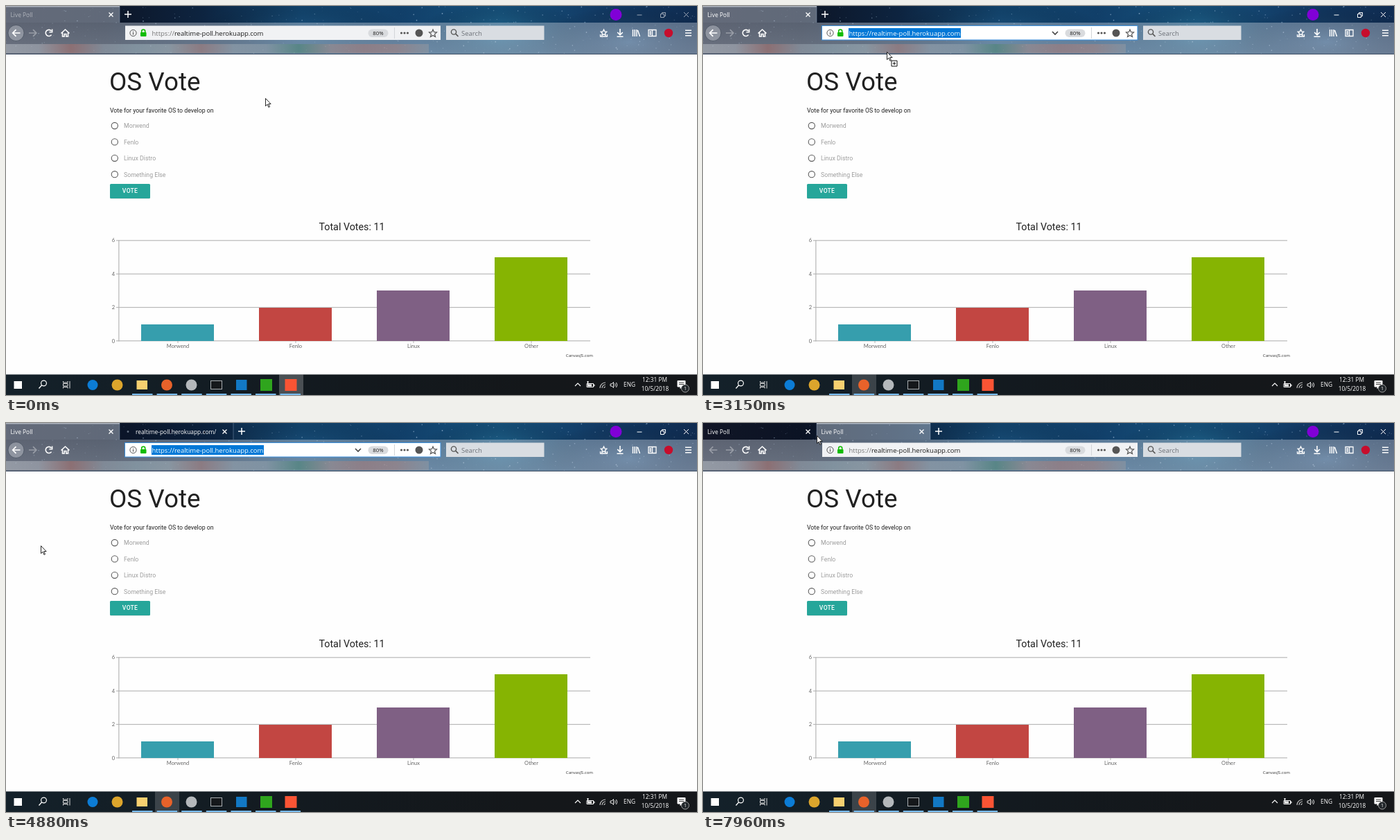
Animation of 997 by 562 pixels, one loop 8000 ms. Source, as an HTML page with a canvas:

```html
<!DOCTYPE html>
<html lang="en">
<head>
<meta charset="utf-8">
<title>Live Poll</title>
<style>
html, body { margin: 0; width: 100%; height: 100%; overflow: hidden; background: #fff; }
canvas { display: block; }
</style>
</head>
<body>
<canvas id="stage" width="997" height="562"></canvas>
<script>
const g = document.getElementById('stage').getContext('2d');
const LOOP = 8000;
const UI = '"Open Sans", "Noto Sans", sans-serif';
const WEB = 'Roboto, sans-serif';
const AXIS = 'Lato, sans-serif';
const HOST = 'realtime-poll.herokuapp.com';

// Pointer path: time, x, y
const PATH = [
  [0, 374, 133], [80, 374, 133], [450, 164, 24], [800, 286, 44], [920, 286, 45],
  [1070, 286, 45], [1180, 275, 51], [1260, 282, 44], [1460, 282, 44], [1570, 281, 41],
  [1720, 281, 41], [1790, 278, 53], [1840, 279, 38], [2110, 279, 38], [2500, 276, 39],
  [2960, 276, 39], [3150, 265, 66], [3650, 142, 12], [3710, 138, 6], [3800, 162, 2],
  [4000, 179, 2], [4110, 179, 2], [4880, 50, 177], [4970, 50, 177], [5500, 204, 3],
  [5800, 206, 3], [7300, 206, 3], [7500, 135, 12], [7720, 135, 12], [7940, 164, 18],
  [8000, 164, 18]
];

const clamp = v => Math.max(0, Math.min(1, v));

function rect(x, y, w, h, color) {
  g.fillStyle = color;
  g.fillRect(x, y, w, h);
}

function round(x, y, w, h, r, color) {
  g.fillStyle = color;
  g.beginPath();
  g.roundRect(x, y, w, h, r);
  g.fill();
}

function disc(x, y, r, color) {
  g.fillStyle = color;
  g.beginPath();
  g.arc(x, y, r, 0, 7);
  g.fill();
}

function ring(x, y, r, color, width = 1) {
  g.strokeStyle = color;
  g.lineWidth = width;
  g.beginPath();
  g.arc(x, y, r, 0, 7);
  g.stroke();
}

// Stroke an SVG path with its origin at x, y
function icon(x, y, d, color = '#fff', width = 1.3, fill) {
  g.save();
  g.translate(x, y);
  const p = new Path2D(d);
  if (fill) { g.fillStyle = fill; g.fill(p); }
  g.strokeStyle = color;
  g.lineWidth = width;
  g.stroke(p);
  g.restore();
}

// y is the middle of the capitals; baselines sit on whole pixels
function text(s, x, y, size, color, font = UI, align = 'left', weight = 400) {
  g.font = `${weight} ${size}px ${font}`;
  g.textAlign = align;
  g.fillStyle = color;
  g.fillText(s, x, Math.round(y + size * 0.36));
  return g.measureText(s).width;
}

function gradient(x0, y0, x1, y1, colors) {
  const fill = g.createLinearGradient(x0, y0, x1, y1);
  colors.forEach((c, i) => fill.addColorStop(i / (colors.length - 1), c));
  return fill;
}

function glow(x, y, r, squash, color) {
  g.save();
  g.translate(x, y);
  g.scale(1, squash);
  const fill = g.createRadialGradient(0, 0, 0, 0, 0, r);
  fill.addColorStop(0, color);
  fill.addColorStop(1, 'rgba(0,0,0,0)');
  g.fillStyle = fill;
  g.fillRect(-r, -r, 2 * r, 2 * r);
  g.restore();
}

function sky() {
  g.save();
  g.beginPath();
  g.rect(0, 0, 997, 70);
  g.clip();
  rect(0, 0, 997, 70, gradient(0, 0, 997, 0,
    ['#141828', '#0d1526', '#0d2440', '#12456f', '#113f69', '#16527d', '#123a64', '#0f2b50']));
  glow(430, 40, 150, 0.35, 'rgba(50,120,175,.35)');
  glow(715, 40, 120, 0.4, 'rgba(60,155,195,.4)');
  glow(900, 52, 130, 0.4, 'rgba(80,130,175,.4)');
  let seed = 7;
  const rnd = () => (seed = seed * 16807 % 2147483647) / 2147483647;
  for (let i = 0; i < 320; i++) {
    disc(rnd() * 997, rnd() * 70, 0.3 + rnd() * 0.6, `rgba(190,215,240,${0.15 + rnd() * 0.45})`);
  }
  g.restore();
}

function cross(x, y, r, color, width = 1.3) {
  icon(x, y, `M${-r} ${-r}L${r} ${r}M${r} ${-r}L${-r} ${r}`, color, width);
}

function tab(x, w, title, on, hover, ink) {
  if (on) {
    rect(x, 0, w, 24, 'rgba(195,205,218,.46)');
    rect(x, 0, w, 1.5, 'rgba(225,230,236,.6)');
  } else {
    rect(x, 0, w, 24, hover ? 'rgba(160,190,225,.2)' : 'rgba(5,12,30,.15)');
  }
  rect(x + w - 0.5, 0, 1, 24, 'rgba(150,175,205,.4)');
  if (w < 150) return;
  text(title, x + (title === 'Live Poll' ? 6.5 : 23), 13, 8.4, ink);
  cross(x + 151.5, 12.5, 3, '#fff');
}

function tabs(t, s) {
  const ink = s.focus ? '#fff' : '#b0b4bb';
  const over = s.y < 24 && !s.drag ? Math.floor(s.x / 164) : -1;
  tab(0, 164, 'Live Poll', !s.second, over === 0, ink);
  const grow = clamp((t - 4150) / 130);
  if (grow) {
    const loading = t < 5000;
    tab(164, 164 * grow, loading ? HOST + '/' : 'Live Poll', s.second, over === 1, ink);
    if (loading && grow === 1) disc(176, 12.5, 1.4, 'rgba(190,205,220,.5)');
  }
  icon(176 + 164 * grow, 12, 'M-5 0H5M0 -5V5', '#fff', 1.5);
  disc(880, 12.5, 8.5, '#8000d7');
  const dim = s.focus ? '#fff' : '#9aa5b5';
  icon(914, 13, 'M-3.5 0H3.5', dim, 1);
  icon(948, 13, 'M-3.5 -1.5H1.5V3.5H-3.5ZM-1.5 -1.5V-3.5H3.5V1.5H1.5', dim, 1);
  cross(981.5, 12.5, 3.5, dim, 1);
}

function toolbar(s) {
  rect(0, 24, 997, 46, gradient(0, 24, 0, 70, ['rgba(195,205,218,.42)', 'rgba(195,205,218,.5)']));

  // Blurred bookmarks
  g.globalAlpha = 0.65;
  rect(0, 55, 610, 13, gradient(0, 0, 610, 0, [
    '#aab0b8', '#a3a8b2', '#a0706e', '#8e98a4', '#8fa3ae', '#9aa8b0', '#a07e7e',
    '#92a0ac', '#8c9ca8', '#4f8578', '#9a8a8c', '#a07c7c', '#a08484', '#8b96a2'
  ]));
  g.globalAlpha = 1;
  rect(0, 69, 997, 1, '#3d4d63');

  const dim = 'rgba(255,255,255,.35)';
  if (!s.second) {
    disc(14.5, 39, 11.5, 'rgba(225,230,236,.35)');
    ring(14.5, 39, 11.5, 'rgba(50,60,75,.55)');
  }
  icon(15, 39, 'M5.5 0H-5M-.5 -4.8L-5.3 0L-.5 4.8', s.second ? dim : '#fff', 1.7);
  icon(38.5, 39, 'M-5.5 0H5M.5 -4.8L5.3 0L.5 4.8', dim, 1.7);
  icon(62, 39, 'M3.6 2.6A4.6 4.6 0 1 1 3.4 -3M4.6 -5.5V-1.3H.4', '#fff', 1.6);
  icon(85.5, 39, 'M-6 .5L0 -5L6 .5M-4 -.5V5H-1.3V1.5H1.3V5H4V-.5', '#fff', 1.6);

  address(s);

  rect(635, 28.5, 141.5, 20.5, '#d9dde2');
  ring(646, 37.5, 3.6, '#555', 1.4);
  icon(646, 37.5, 'M2.6 2.6L6.5 6.5', '#555', 1.6);
  text('Search', 657, 39.5, 9.5, '#6d7178');

  icon(862.5, 39, 'M0 -5L1.3 -2.2L4.3 -1.8L2.1 .3L2.7 3.2L0 1.8L-2.7 3.2L-2.1 .3L-4.3 -1.8L-1.3 -2.2ZM-5 2V5H5V2');
  icon(886, 39, 'M0 -6V2.5M-3.8 -1L0 2.8L3.8 -1M-4.5 5.2H4.5', '#fff', 1.6);
  icon(909, 39, 'M-4.5 -5V5M-1.7 -5V5M1 -5V5M2.5 -4L5.5 5', '#fff', 1.5);
  icon(932.5, 39, 'M-5.5 -4.5H5.5V4.5H-5.5ZM0 -4.5V4.5M-4 -2H-1.5M-4 0H-1.5M-4 2H-1.5', '#fff', 1.3);
  disc(956, 39, 6.2, '#c70d2c');
  icon(984.5, 39, 'M-4.5 -3.7H4.5M-4.5 0H4.5M-4.5 3.7H4.5', '#fff', 1.5);
}

function address(s) {
  rect(172, 28.5, 455, 20.5, s.edit ? '#fff' : '#f1f2f4');
  if (s.edit) {
    g.strokeStyle = '#3c90dd';
    g.lineWidth = 1;
    g.strokeRect(171.5, 28.5, 455.5, 20.5);
  }
  ring(183.5, 39, 4.6, '#555');
  icon(183.5, 39, 'M0 -.8V2.6M0 -2.6V-1.6', '#555', 1.2);
  round(194, 38, 8.5, 6, 1, '#12bc00');
  icon(198.2, 38, 'M-2.5 1V-1.5A2.5 2.5 0 0 1 2.5 -1.5V1', '#12bc00', 1.6);

  if (s.edit) rect(210, 32, 162, 14, '#0078d7');
  const w = text('https://', 210.5, 39.5, 9.5, s.edit ? '#fff' : '#777');
  text(HOST, 210.5 + w, 39.5, 9.5, s.edit ? '#fff' : '#1c1c1c');

  if (s.edit || s.overBar) icon(508, 39, 'M-4 -2L0 2L4 -2', '#444', 1.6);
  round(522.5, 33.5, 29, 11.5, 5.7, '#d9dbde');
  text('80%', 537, 39.5, 7.8, '#222', UI, 'center');
  rect(560, 31, 1, 16, '#d3d5d8');
  for (const x of [570.5, 575, 579.5]) disc(x, 39, 1.6, '#555');
  disc(596, 39, 5.5, '#555');
  icon(616, 39.5, 'M0 -5.5L1.6 -1.8L5.5 -1.5L2.5 1.1L3.5 5L0 2.9L-3.5 5L-2.5 1.1L-5.5 -1.5L-1.6 -1.8Z', '#555', 1.2);
}

function page() {
  rect(0, 70, 997, 462.5, '#fefefe');
  text('OS Vote', 149, 108.5, 36.8, '#212121', WEB);
  text('Vote for your favorite OS to develop on', 150, 150.5, 8.76, '#212121', WEB);
  ['Morwend', 'Fenlo', 'Linux Distro', 'Something Else'].forEach((name, i) => {
    const y = 173 + i * 23.4;
    ring(156.8, y, 4.6, '#5a5a5a', 1.1);
    text(name, 170, y + 0.3, 8.76, '#9e9e9e', WEB);
  });
  round(150, 258, 58, 20.5, 1.5, 'rgba(0,0,0,.18)');
  round(150, 257, 58, 21, 1.5, '#26a69a');
  g.letterSpacing = '0.3px';
  text('VOTE', 179, 267, 8.6, '#fff', WEB, 'center', 500);
  g.letterSpacing = '0px';

  text('Total Votes: 11', 499, 319, 14.3, '#212121', WEB, 'center');
  for (let v = 0; v <= 6; v += 2) {
    const y = 483.8 - v * 24.17;
    rect(159, y - 0.6, 684, 1.2, '#b9b9b9');
    text(v, 157, y, 7.5, '#666', AXIS, 'right');
  }
  rect(162.3, 338.5, 1.1, 146, '#b0b0b0');
  [['Morwend', 1, '#369ead'], ['Fenlo', 2, '#c24642'], ['Linux', 3, '#7f6084'], ['Other', 5, '#86b402']]
    .forEach(([name, votes, color], i) => {
      const x = 195 + i * 170;
      const top = Math.round(484 - votes * 24.17);
      rect(x, top, 105, 484 - top, color);
      rect(x + 52.5, 484, 1, 3, '#b0b0b0');
      text(name, x + 53, 491, 7.6, '#666', AXIS, 'center');
    });
  text('CanvasJS.com', 847, 504.5, 6.1, '#333', UI, 'right');
}

function taskbar(t) {
  rect(0, 532.5, 997, 29.5, gradient(0, 0, 997, 0, ['#14212a', '#131d24', '#13191e', '#14171a', '#15171a']));
  const k = clamp((t - 2150) / 300);
  rect(215, 532.5, 35, 29.5, `rgba(255,255,255,${0.17 * k})`);
  rect(394, 532.5, 35, 29.5, `rgba(255,255,255,${0.23 * (1 - k)})`);
  rect(11.5, 542, 11.5, 11, '#fff');
  ring(54.5, 545, 3.9, '#fff', 1.2);
  icon(54.5, 545, 'M-2.8 2.8L-7 7.5', '#fff', 1.3);
  icon(87, 547, 'M-4.5 -5V-3H2V-5M-4.5 -1.5H2V2H-4.5ZM-4.5 5.5V3.5H2V5.5M5 -5V5.5', '#ddd', 1);

  disc(125, 547.5, 7.5, '#0c7cd5');
  disc(160.5, 547.5, 8, '#dca52c');
  rect(188.5, 541, 15.5, 13, '#f7d070');
  disc(232, 547.5, 8, '#e8622a');
  disc(267.5, 547.5, 8, '#b4b8bb');
  rect(295, 541, 17, 13, '#15181b');
  g.strokeStyle = '#a9adb0';
  g.lineWidth = 1;
  g.strokeRect(295.5, 541.5, 16, 12);
  rect(332, 540, 15.5, 15, '#1278c4');
  rect(367, 539, 17, 17, '#2fa51d');
  rect(402.5, 539, 17, 17, '#fa5434');
  for (let i = 0; i < 7; i++) rect(182 + i * 35.6, 560, 29.5, 2, '#76b9ed');

  icon(825, 547, 'M-4 2L0 -2L4 2', '#fff', 1.1);
  icon(843, 548, 'M-5 -2.5H4.5V2.5H-5ZM4.5 -1H6V1H4.5', '#fff', 1);
  rect(839, 546.5, 6, 3, '#fff');
  icon(839.5, 544, 'M0 3V-2M-1.5 -1H1.5', '#fff', 1);
  icon(865, 552, 'M-8 0A8 8 0 0 1 0 -8M-5 0A5 5 0 0 1 0 -5M-2 0A2 2 0 0 1 0 -2', '#ccc', 1.1);
  icon(876, 547.5, 'M-4 -1.5H-2L.5 -4V4L-2 1.5H-4ZM2.5 -2Q4 0 2.5 2M4.5 -3.5Q7 0 4.5 3.5', '#fff', 0.9);
  text('ENG', 899.5, 547, 8.3, '#fff', UI, 'center');
  text('12:31 PM', 936, 540, 8.3, '#fff', UI, 'center');
  text('10/5/2018', 936.5, 553, 8.3, '#fff', UI, 'center');
  icon(974.5, 546.5, 'M-5.5 -5H5.5V3.5H1L-1.5 6V3.5H-5.5Z', '#fff', 1, '#fff');
  icon(974.5, 546.5, 'M-3.5 -2.5H3.5M-3.5 0H3.5', '#222', 0.9);
  disc(980, 552.5, 5.5, '#22272b');
  ring(980, 552.5, 5.5, '#aaa', 0.9);
  text('1', 980, 552.7, 7, '#fff', UI, 'center');
}

// Speed at a path point: zero where the pointer rests or turns back
function slope(i, axis) {
  const a = PATH[i - 1], b = PATH[i], c = PATH[i + 1];
  if (!a || !c || (b[axis] - a[axis]) * (c[axis] - b[axis]) <= 0) return 0;
  return (c[axis] - a[axis]) / (c[0] - a[0]);
}

function pointer(t) {
  const i = PATH.findIndex(p => p[0] > t);
  const a = PATH[i - 1], b = PATH[i];
  const d = b[0] - a[0], k = (t - a[0]) / d, e = k * k * (3 - 2 * k);
  return [1, 2].map(n => Math.round(a[n] + (b[n] - a[n]) * e
    + d * k * (1 - k) * ((1 - k) * slope(i - 1, n) - k * slope(i, n))));
}

function cursor(t, { x, y, drag, overBar }) {
  if (overBar && x > 208 && !drag) {
    icon(x, y, 'M-2.5 -5.5H-.5M.5 -5.5H2.5M0 -5V5M-2.5 5.5H-.5M.5 5.5H2.5', '#111', 1);
    return;
  }
  if (drag && t > 3200) {
    text('https://' + HOST, x - 67, y + 4, 9.25,
      gradient(x - 67, 0, x + 90, 0, ['rgba(0,0,0,.8)', 'rgba(0,0,0,.75)', 'rgba(0,0,0,.15)']));
  }
  icon(x + 0.5, y + 0.5, 'M0 0V11L2.6 8.6L4.4 12.8L6 12.1L4.2 8H7.6Z', '#111', 0.9, '#fff');
  if (drag) {
    rect(x + 7, y + 13, 8, 8, '#fff');
    icon(x + 11, y + 17, 'M-4 -4H4V4H-4ZM-2.2 0H2.2M0 -2.2V2.2', '#111', 1);
  }
}

function draw(t) {
  const [x, y] = pointer(t);
  const s = {
    x, y,
    focus: t >= 2150,
    edit: t >= 2230 && t < 5000,
    drag: t >= 3000 && t < 4150,
    overBar: x > 171 && x < 627 && y > 27 && y < 55,
    second: (t >= 5880 && t < 7440) || t >= 7920
  };
  g.drawImage(backdrop, 0, 0);
  tabs(t, s);
  toolbar(s);
  page();
  taskbar(t);
  if (t >= 6260 && t < 7340) {
    rect(214, 15, 43, 17, '#767676');
    rect(215, 16, 41, 15, '#fff');
    text('Live Poll', 235.5, 23.5, 8.4, '#575757', UI, 'center');
  }
  cursor(t, s);
}

sky();
const backdrop = document.createElement('canvas');
backdrop.width = 997;
backdrop.height = 70;
backdrop.getContext('2d').drawImage(g.canvas, 0, 0);

const start = performance.now();
function tick() {
  draw((performance.now() - start) % LOOP);
  requestAnimationFrame(tick);
}
tick();
</script>
</body>
</html>
```
